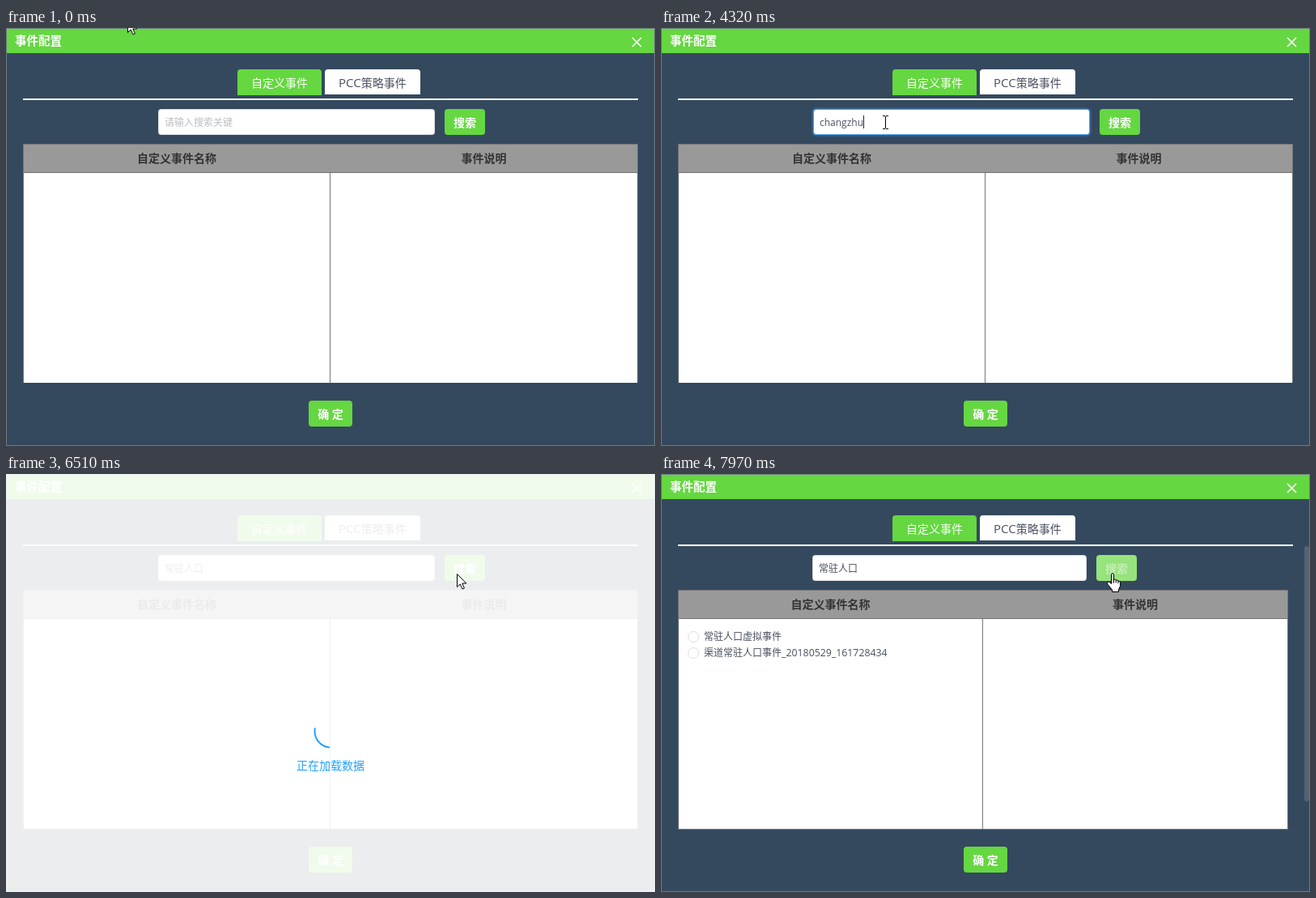
An HTML page with a canvas that plays this animation: 802 px wide and 516 px high, repeating every 8000 ms.

```html
<!DOCTYPE html>
<html lang="zh-CN">
<head>
<meta charset="utf-8">
<title>事件配置</title>
<style>
html, body { margin: 0; width: 100%; height: 100%; overflow: hidden; background: #34495e; }
canvas { display: block; }
</style>
</head>
<body>
<canvas id="stage" width="802" height="516"></canvas>
<script>
const ctx = document.getElementById('stage').getContext('2d');
const LOOP = 8000;
const GREEN = '#65d741', BLUE = '#20a0ff', INK = '#495060', LINE = '#777';
const CJK = '"Noto Sans CJK SC", "Noto Sans CJK", sans-serif';
const LATIN = '"Open Sans", "Noto Sans CJK SC", sans-serif';

// Timeline, ms
const FOCUS = 2300, TYPE = 3600, COMMIT = 4870, BLUR = 6100;
const LOAD = 6200, LOADED = 7500, FADE_OUT = 7520, READY = 7850;
const PINYIN = 'changzhurenkou', WORD = '常驻人口';

const bursts = [[120, 1090, 8], [1650, 2510, 7], [2930, 2930, 1], [3490, 4040, 5],
  [4320, 5010, 6], [5410, 6360, 8], [6510, 7460, 8]];
const ticks = [0];
for (const [a, b, n] of bursts)
  for (let i = 0; i < n; i++) ticks.push(a + (n > 1 ? (b - a) * i / (n - 1) : 0));
ticks.push(7580, 7700, 7850, 7970);

function snap(t) {
  let last = 0;
  for (const k of ticks) if (k <= t + 0.01) last = k;
  return last;
}

// Pointer path: [time, x, y]
const path = [[0, 150, -11], [119, 150, -11], [258, 135, 8], [420, 150, 40], [674, 210, 85],
  [813, 260, 105], [1090, 318, 112], [1640, 318, 112], [1650, 323, 79], [1790, 325, 70],
  [1930, 310, 90], [2070, 292, 108], [2220, 277, 116], [5400, 277, 116], [5560, 330, 118],
  [5700, 450, 122], [5850, 545, 124], [5950, 557, 123], [LOOP, 557, 123]];

function pointer(t) {
  let i = 1;
  while (i < path.length - 1 && path[i][0] < t) i++;
  const [t0, x0, y0] = path[i - 1], [t1, x1, y1] = path[i];
  const p = (t - t0) / (t1 - t0);
  return { x: Math.round(x0 + (x1 - x0) * p), y: Math.round(y0 + (y1 - y0) * p) };
}

const inside = (p, x, y, w, h) => p.x >= x && p.x < x + w && p.y >= y && p.y < y + h;
const clamp = v => Math.max(0, Math.min(1, v));

function bezier(x1, y1, x2, y2) {
  const at = (a, b, s) => 3 * a * s * (1 - s) ** 2 + 3 * b * s * s * (1 - s) + s ** 3;
  return x => {
    let lo = 0, hi = 1;
    for (let i = 0; i < 24; i++) {
      const mid = (lo + hi) / 2;
      if (at(x1, x2, mid) < x) lo = mid; else hi = mid;
    }
    return at(y1, y2, (lo + hi) / 2);
  };
}
const ease = bezier(0.25, 0.1, 0.25, 1);
const easeInOut = bezier(0.42, 0, 0.58, 1);

function rect(x, y, w, h, color) {
  ctx.fillStyle = color;
  ctx.fillRect(x, y, w, h);
}

function round(x, y, w, h, r, color) {
  ctx.beginPath();
  ctx.roundRect(x, y, w, h, r);
  ctx.fillStyle = color;
  ctx.fill();
}

function text(str, x, y, size, color, { weight = 400, align = 'left', family = CJK } = {}) {
  ctx.font = `${weight} ${size}px ${family}`;
  ctx.textAlign = align;
  ctx.fillStyle = color;
  ctx.fillText(str, x, y);
  return ctx.measureText(str).width;
}

function drawFrame() {
  rect(0, 0, 802, 516, '#34495e');
  rect(0, 0, 802, 31, GREEN);
  ctx.strokeStyle = '#6f7a85';
  ctx.lineWidth = 1;
  ctx.strokeRect(0.5, 0.5, 801, 515);
  text('事件配置', 11, 21, 14.5, '#fff', { weight: 700 });
  ctx.strokeStyle = '#fff';
  ctx.lineWidth = 1.6;
  ctx.beginPath();
  ctx.moveTo(774, 12); ctx.lineTo(785, 23);
  ctx.moveTo(785, 12); ctx.lineTo(774, 23);
  ctx.stroke();

  round(286, 51, 104, 32, [4, 4, 0, 0], GREEN);
  round(394, 51, 118, 31, [4, 4, 0, 0], '#fff');
  text('自定义事件', 303, 73, 14, '#fff');
  const w = text('PCC', 411, 73, 15, INK, { family: LATIN });
  text('策略事件', 411 + w, 73, 14, INK);
  rect(21, 87, 760, 2, '#fff');

  round(374, 460, 54, 32, 4, GREEN);
  text('确 定', 401, 482, 14, '#fff', { weight: 700, align: 'center', family: LATIN });
}

function drawInput(t, x, w) {
  const over = s => s < LOAD && inside(pointer(s), x, 100, w, 32);
  const focused = t >= FOCUS && t < BLUR;
  const glow = focused ? 2 : over(t) + over(Math.max(0, t - 100));
  if (focused) round(x - 2, 98, w + 4, 36, 6, 'rgba(45,140,240,0.3)');
  round(x, 100, w, 32, 4, ['#dddee1', '#9ac8f5', '#57a3f3'][glow]);
  round(x + 1, 101, w - 2, 30, 3, '#fff');

  const left = x + 8;
  const count = Math.floor(clamp((t - TYPE) / 1150) * PINYIN.length);
  const typing = t >= TYPE && t < COMMIT;
  let width = 0;
  if (t >= COMMIT) width = text(WORD, left, 121, 12, INK);
  else if (typing) width = text(PINYIN.slice(0, Math.max(1, count)), left, 121, 12, INK, { family: LATIN });
  else text('请输入搜索关键', left, 121, 12, '#bbbec4');

  const base = t < COMMIT ? 2400 : COMMIT;
  const lit = typing || Math.floor((t - base) / 530) % 2 === 0;
  if (focused && lit) rect(Math.round(left + width), 108, 1, 16, '#222');
}

function drawTable(right, split, loaded) {
  rect(21, 143, right - 21, 295, LINE);
  rect(22, 144, right - 23, 34, '#999');
  rect(22, 179, right - 23, 259, '#fff');
  rect(split, 179, 1, 259, LINE);
  rect(21, 178, right - 21, 1, LINE);
  const head = { weight: 700, align: 'center' };
  text('自定义事件名称', (22 + split) / 2, 166, 14, '#333', head);
  text('事件说明', (split + right) / 2, 166, 14, '#333', head);
  if (!loaded) return;

  rect(21, 438, right - 21, 1, LINE);
  for (const y of [201, 221]) {
    ctx.beginPath();
    ctx.arc(40, y, 6.5, 0, 7);
    ctx.strokeStyle = '#dddee1';
    ctx.lineWidth = 1;
    ctx.stroke();
  }
  text('常驻人口虚拟事件', 53, 205, 12, INK);
  const w = text('渠道常驻人口事件', 53, 225, 12, INK);
  text('_20180529_161728434', 53 + w, 225, 12.3, INK, { family: LATIN });
  round(795, 89, 6, 315, 3, '#566271');
}

function drawLoading(t) {
  const alpha = t < FADE_OUT ? ease(clamp((t - LOAD) / 300)) : 1 - ease(clamp((t - FADE_OUT) / 300));
  if (t < LOAD || alpha <= 0.001) return;
  ctx.save();
  ctx.globalAlpha = alpha;
  rect(0, 0, 802, 516, 'rgba(255,255,255,0.9)');
  text('正在加载数据', 401, 365, 14, BLUE, { align: 'center' });

  // Dash grows, then slides off the end of the ring
  const e = t - LOAD, p = (e % 1500) / 750;
  const k = easeInOut(p % 1);
  const len = p < 1 ? 1 + 89 * k : 90;
  const start = p < 1 ? 40 * k : 40 + 80 * k;
  const turn = e / 2000 * Math.PI * 2, r = 20;
  ctx.beginPath();
  ctx.arc(401.5, 317.5, r, turn + start / r, turn + Math.min((start + len) / r, Math.PI * 2));
  ctx.strokeStyle = BLUE;
  ctx.lineWidth = 2;
  ctx.lineCap = 'round';
  ctx.stroke();
  ctx.restore();
}

const ARROW = new Path2D('M.5 .5V16.5L4.2 13L7 19L9.4 18L6.8 12H11.8Z');
const HAND = new Path2D('M5.5 2.2Q5.5.6 7 .6T8.5 2.2V8.2Q10.8 7.6 11.2 9Q13.4 8.6 13.9 10Q16.5 9.8 16.5 12.2V16.5L14.5 20.5V23.5H6.5V21L1.2 14.5Q-.2 12.4 1.2 11.4Q2.6 10.6 4 12L5.5 13.5Z');
const KNUCKLES = new Path2D('M8.5 8V12.5M11.2 9V12.5M13.9 10V13');

function drawPointer(t, button) {
  const p = pointer(t);
  const busy = t >= LOAD && t < READY;
  const onTab = inside(p, 286, 51, 104, 32);
  const onButton = inside(p, button, 100, 50, 32);
  ctx.save();
  ctx.lineWidth = 1;
  ctx.strokeStyle = '#000';
  ctx.fillStyle = '#fff';
  if (!busy && inside(p, 188, 100, 342, 32)) {
    rect(p.x, p.y - 7, 1, 15, '#000');
    for (const y of [p.y - 8, p.y + 8]) {
      rect(p.x - 3, y, 3, 1, '#000');
      rect(p.x + 1, y, 3, 1, '#000');
    }
  } else if (!busy && (onTab || onButton)) {
    ctx.translate(p.x - 6, p.y - 1);
    ctx.fill(HAND);
    ctx.stroke(HAND);
    ctx.stroke(KNUCKLES);
  } else {
    ctx.translate(p.x, p.y);
    ctx.fill(ARROW);
    ctx.stroke(ARROW);
  }
  ctx.restore();
}

function draw(t) {
  const loaded = t >= LOADED;
  const button = loaded ? 538 : 542;
  const hover = (t < LOAD || t >= READY) && inside(pointer(t), button, 100, 50, 32);
  drawFrame();
  drawInput(t, loaded ? 187 : 188, loaded ? 339 : 342);
  round(button, 100, 50, 32, 4, hover ? '#97e37c' : GREEN);
  text('搜索', button + 25, 122, 14, hover ? '#c3efb4' : '#fff', { weight: 700, align: 'center' });
  drawTable(loaded ? 775 : 781, loaded ? 397 : 400, loaded);
  drawLoading(t);
  drawPointer(t, button);
}

const begin = performance.now();
function tick() {
  draw(snap((performance.now() - begin) % LOOP));
  requestAnimationFrame(tick);
}
tick();
</script>
</body>
</html>
```
